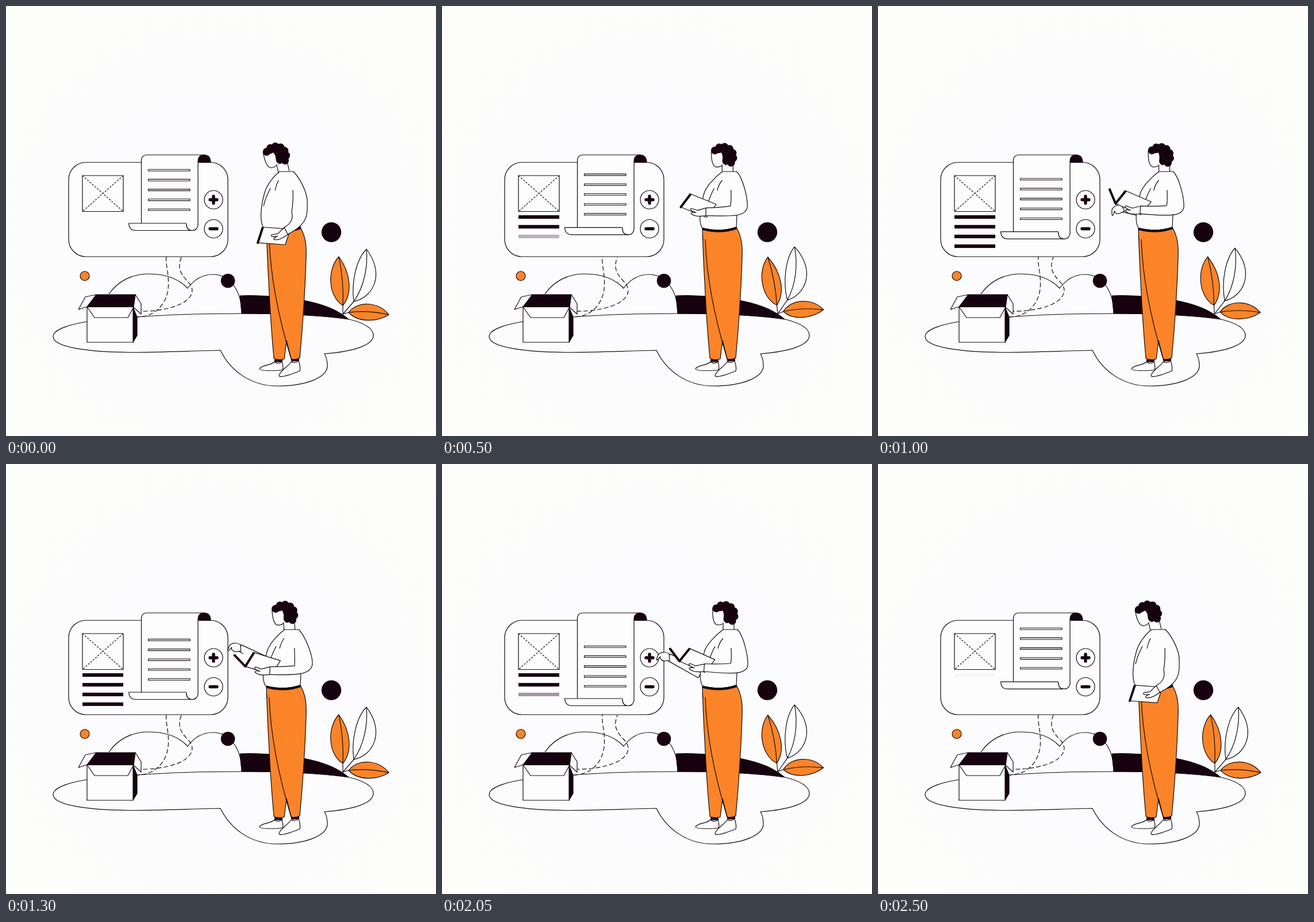
Write an HTML page with a canvas that moves like this. It is 748 px wide and 748 px high and loops after 2.55 s.

```html
<!DOCTYPE html>
<html lang="en">
<head>
<meta charset="utf-8">
<title>Reading and ordering</title>
<style>
html, body { margin: 0; width: 100%; height: 100%; overflow: hidden; background: #fcfcfe; }
canvas { display: block; width: 100vw; height: 100vh; }
</style>
</head>
<body>
<canvas id="stage" width="748" height="748"></canvas>
<script>
const ctx = document.getElementById('stage').getContext('2d');
const LOOP = 2550;
const INK = '#170310', LINE = '#120a10', ORANGE = '#fb8429', PAPER = '#fdfdfe';

const clamp = u => Math.min(1, Math.max(0, u));
const progress = (t, from, to) => clamp((t - from) / (to - from));
const smooth = (t, from, to) => {
  const u = progress(t, from, to);
  return u * u * (3 - 2 * u);
};
const easeOut = (t, from, to) => Math.sin(progress(t, from, to) * Math.PI / 2);
const mix = (a, b, u) => a + (b - a) * u;
const radians = degrees => degrees * Math.PI / 180;

// The reader lifts the book, opens it, reaches for the button, nods and puts everything back.
function poseAt(t) {
  const lift = easeOut(t, 0, 700) * (1 - smooth(t, 2050, 2480));
  const nod = .67 * smooth(t, 900, 1700) * (1 - smooth(t, 1700, 2050));
  return {
    lift, nod,
    lean: 1 - lift + nod,
    open: smooth(t, 500, 1200) * (1 - smooth(t, 2080, 2420)),
    appear: smooth(t, 400, 750) * (1 - smooth(t, 2240, 2440)),
    reach: smooth(t, 750, 1250) * (1 - smooth(t, 2070, 2300)),
    press: smooth(t, 1250, 1800) * (1 - smooth(t, 2070, 2300))
  };
}

function draw(path, fill, stroke = LINE, width = 1.2) {
  const p = path instanceof Path2D ? path : new Path2D(path);
  if (fill) { ctx.fillStyle = fill; ctx.fill(p); }
  if (stroke) { ctx.strokeStyle = stroke; ctx.lineWidth = width; ctx.stroke(p); }
}

function disc(x, y, r, fill, stroke) {
  const p = new Path2D();
  p.arc(x, y, r, 0, 7);
  draw(p, fill, stroke);
}

function dashed(path, pattern, offset = 0) {
  ctx.setLineDash(pattern);
  ctx.lineDashOffset = offset;
  draw(path);
  ctx.setLineDash([]);
}

function at(x, y, angle, paint) {
  ctx.save();
  ctx.translate(x, y);
  ctx.rotate(angle);
  paint();
  ctx.restore();
}

function background() {
  const g = ctx.createRadialGradient(374, 400, 230, 374, 400, 540);
  g.addColorStop(0, '#fcfcfe');
  g.addColorStop(1, '#fdfdf9');
  ctx.fillStyle = g;
  ctx.fillRect(0, 0, 748, 748);
}

function landscape(t) {
  draw('M407 504 L425 503.5 C500 505 545 516 570 528 C582 534 591 540 596 545 C550 538 480 535 410 535 Z', INK, INK, 1);
  draw('M179 501 C195 478 220 466 248 466 C278 466 301 475 316 491 C327 476 342 467 360 467 C388 467 410 493 410 535');
  draw('M141 549 C105 555 82 564 82 575 C82 594 145 602 215 602.5 C270 602.5 320 600 373 599 C390 634 425 661 472 661 C525 661 559 645 559 626 C559 617 557 610 554 605 C605 601 639 590 639 573 C639 560 622 551 595 544.5 C540 537 470 535 410 535 C340 535 280 537 227 541');
  const flow = -t / LOOP * 24;
  dashed('M279 436 C277 448 283 462 282.5 485 C282 515 262 541 228 541', [8, 4], flow);
  dashed('M305 437 C298 455 303 465 315 478 C325 488 327 497 319 507 C308 522 270 532 229 531', [8, 4], flow);
  disc(137, 469.5, 8, ORANGE, LINE);
  disc(386, 478, 12.3, INK, null);
  disc(566, 393.5, 17.2, INK, null);
}

function box() {
  draw('M157 502 H225 L222 524 H141 Z', INK);
  draw('M221 524 L228 541 V573 L221 585 Z', INK);
  draw('M141 523.5 H221 V585 H141 Z', PAPER);
  draw('M157 502 L138 506 L126 528 L141 523 Z', PAPER);
  draw('M225 502 L235 518 V536 L222 524 Z', PAPER);
  draw('M141 523.5 L154 542 H212 L222 523.5 Z', PAPER);
}

function plant(t) {
  const sway = radians(3.3) * (1 - Math.cos(4 * Math.PI * t / LOOP));
  at(580, 555, -sway, () => {
    ctx.translate(-580, -555);
    draw('M579 436 C558 458 560 505 586 521 C603 500 600 465 579 436 Z', ORANGE);
    draw('M579 436 Q588 480 586 521 V536');
    draw('M627 423 C610 440 600 480 605 514 C637 508 661 468 627 423 Z', PAPER);
    draw('M627 423 C630 455 622 490 605 514 L586 536');
    draw('M596 533 C612 512 648 514 666 537 C645 550 612 551 596 533 Z', ORANGE);
    draw('M666 537 Q630 529 596 533 L586 536');
  });
}

function card(t) {
  const frame = new Path2D();
  frame.roundRect(109, 272, 277, 164, 30);
  draw(frame, PAPER);
  draw('M133 295 H204 V357.5 H133 Z');
  dashed('M133 295 L204 357.5 M204 295 L133 357.5', [3.2, 2.4]);

  // Bars fade in from the top and out from the bottom.
  for (let i = 0; i < 4; i++) {
    const fadeIn = (t - 108) / 171 - i, fadeOut = (1936 - t) / 190 + 3 - i;
    ctx.globalAlpha = clamp(Math.min(fadeIn, fadeOut));
    ctx.fillStyle = INK;
    ctx.fillRect(133, 364 + i * 16.9, 71, 6.2);
  }
  ctx.globalAlpha = 1;

  ctx.lineCap = 'round';
  disc(361, 337, 16, PAPER, LINE);
  disc(361, 387.5, 16, PAPER, LINE);
  draw('M355 337 H367 M361 331 V343', null, INK, 5.4);
  draw('M355 387.5 H367', null, INK, 5.4);
  ctx.lineCap = 'butt';
}

function receipt(t) {
  const shift = 32.7 * progress(t, 0, 2080) * (1 - smooth(t, 2080, LOOP));
  const y = 378 + shift * .93;
  const sheet = `M235.5 ${y} V269 C235.5 263 239 259 246 259 H345 C338 259 334 263 334 270 V${y + 3}`;
  draw('M334 272 V270 C334 263 339 259 345 259 C352 259 356 264 356 272 Z', INK);
  draw(sheet, PAPER);
  draw(`M213.5 ${y} H313 C314 ${y} 314 ${y + 1} 314 ${y + 3} A10 10 0 0 0 324 ${y + 12.5}
    H226 C218 ${y + 12.5} 214 ${y + 8} 213.5 ${y} Z`, PAPER);
  draw(`M314 ${y + 2} C314 ${y + 9} 318 ${y + 12.5} 324 ${y + 12.5} C330 ${y + 12.5} 334 ${y + 8} 334 ${y + 2}`, PAPER);
  for (let i = 0; i < 5; i++) {
    const p = new Path2D();
    p.rect(247.5, 284.2 + i * 17.2 + shift, 72.5, 2.8);
    draw(p, PAPER, LINE, 1.1);
  }
}

function legs() {
  draw('M467 617 L481 617 M496 616 L510 615', null, INK, 5);
  draw('M467 619 C460 626 445 624 441 631 C442 636 475 634 481 633 C483 628 481 623 480 619 Q473 624 467 619 Z', PAPER);
  draw('M496 619 C490 628 476 635 475 643 C477 649 505 637 511 635 C513 628 510 622 509 617 Q503 622 496 619 Z', PAPER);
  draw('M453 387 C454 420 455 450 457 480 C459 530 463 580 466 613 Q474 617 484 614 L488 582 L496 614 Q504 616 511 612 C515 570 520 500 522 440 C523 420 522 402 512 385 Z', ORANGE);
  draw('M458 406 C460 470 472 535 496 614 M453 400 L454 407');
}

function head({ lean }) {
  at(498 - 16 * lean, 288 - 3 * lean, radians(-13 * lean), () => {
    ctx.translate(-498, -288);
    draw('M471 250 C470 266 472 280 480 280 C484 280 487 279 489 277 V292 H508 V275 L500 250 Z', PAPER, null);
    draw('M471 250 C470 266 472 280 480 280 C484 280 488 279 490 276 M489 278 V292 M508 276 V292');
    draw('M474 252 Q481 258 488 255 Q491 260 490 266 Q488 274 495 277 L506 274 L509 250 L495 243 L476 245 Z', INK, null);
    for (let i = 0; i < 7; i++) {
      const a = radians(30 * i - 140);
      disc(491 + 18 * Math.cos(a), 262 + 17 * Math.sin(a), 6.8, INK, null);
    }
  });
}

function torso({ lean }) {
  const left = 489 - 13 * lean, right = 514 - 14 * lean;
  const side = 456 - 7 * lean, hem = 453 - 5 * lean, fold = 15 * lean;
  draw(`M${left} 288 C${left - 12} 297 ${side + 3} 314 ${side} 328 C${side - 6} 350 ${hem - 7} 374 ${hem} 386
    Q482 394 512 385 L513 364 L${right} 288 Z`, PAPER);
  draw(`M${489 - fold} 303 Q${482 - fold * .8} 311 ${480 - fold * .8} 321
    M${475 - fold} 317 Q${466 - fold} 334 ${463 - fold} 348`);
  draw('M453 387.5 Q484 396 512.5 386', null, INK, 4);
}

function reachingArm({ appear, reach, press, nod }) {
  const wx = 482 - 39 * appear - 36 * reach - 13 * press;
  const wy = 372 + 10 * appear - 59 * reach + 13 * press - 10 * nod;
  const dx = mix(28, 56, reach), dy = mix(-14, 28, reach);
  const len = Math.hypot(dx, dy), nx = -dy / len, ny = dx / len;
  const ex = wx + dx, ey = wy + dy;
  draw(`M${ex - nx * 8} ${ey - ny * 8} L${wx - nx * 6} ${wy - ny * 6}
    L${wx + nx * 6} ${wy + ny * 6} L${ex + nx * 9} ${ey + ny * 9} Z`, PAPER);
  at(wx, wy, -.8 * (1 - reach), () =>
    draw('M1 -6 C-6 -10 -14 -9 -18 -4 L-21 4 C-20 7 -18 3 -14 -1 C-16 4 -9 8 -4 6 L2 6 Z', PAPER));
}

function openBook({ lift, nod, lean, open }) {
  const x = 438 - 25 * lift + 10 * nod, y = 412 - 69 * lift + 27 * nod;
  const tilt = 39 - 21 * lean, page = radians(24 - 20 * lean);
  const edge = degrees => [x + 28.5 * Math.sin(radians(degrees)), y - 28.5 * Math.cos(radians(degrees))];
  const back = edge(tilt), front = edge(tilt - 76 * open);
  const px = 48 * Math.cos(page), py = 48 * Math.sin(page);
  draw(`M${front} L${x} ${y} L${back} Z`, PAPER, null);
  draw(`M${back} l${px} ${py} L${x + px} ${y + py} L${x} ${y} Z`, PAPER);
  draw(`M${front} L${x} ${y} L${back}`, null, INK, 4);
}

function holdingArm({ lift, nod, lean }) {
  const cx = 487 - 31 * lift + 9 * nod, cy = 391 - 37 * lift + 15 * nod;
  const ox = 524 + 8 * lift + 3 * nod, oy = 340 + 8 * lift - 4 * nod;
  const ix = 497 + 5 * lift, iy = 358 - 11 * lift + 12 * nod;
  const angle = -.47 + .55 * lift - .12 * nod;
  const c = Math.cos(angle), s = Math.sin(angle);
  const local = (x, y) => `${cx + x * c - y * s} ${cy + x * s + y * c}`;
  const shoulder = 514 - 14 * lean, fold = 503 - 4 * lean;
  const outer = `M${shoulder} 288 C${shoulder + 10} 298 ${ox} ${oy - 17} ${ox} ${oy} C${ox} ${oy + 21} ${local(42, 7)} ${local(0, 7)}`;
  const inner = `L${local(0, -6.5)} Q${local(20, -7)} ${ix} ${iy}`;
  at(cx, cy, angle, () =>
    draw('M1 -6 C-6 -6 -12 -1 -16 -2 L-25 -5 C-29 -4 -26 0 -17 2 C-26 1 -28 4 -23 6 C-18 9 -10 9 1 7 Z', PAPER));
  draw(`${outer} ${inner} L${fold} 320 Z`, PAPER, null);
  draw(`${outer} ${inner} Q${fold + 1} 340 ${fold} 320`);
}

function render(t) {
  const pose = poseAt(t);
  ctx.lineJoin = 'round';
  background();
  landscape(t);
  box();
  plant(t);
  card(t);
  receipt(t);
  reachingArm(pose);
  legs();
  head(pose);
  torso(pose);
  openBook(pose);
  holdingArm(pose);
}

const start = performance.now();
function tick() {
  render((performance.now() - start) % LOOP);
  requestAnimationFrame(tick);
}
tick();
</script>
</body>
</html>
```
